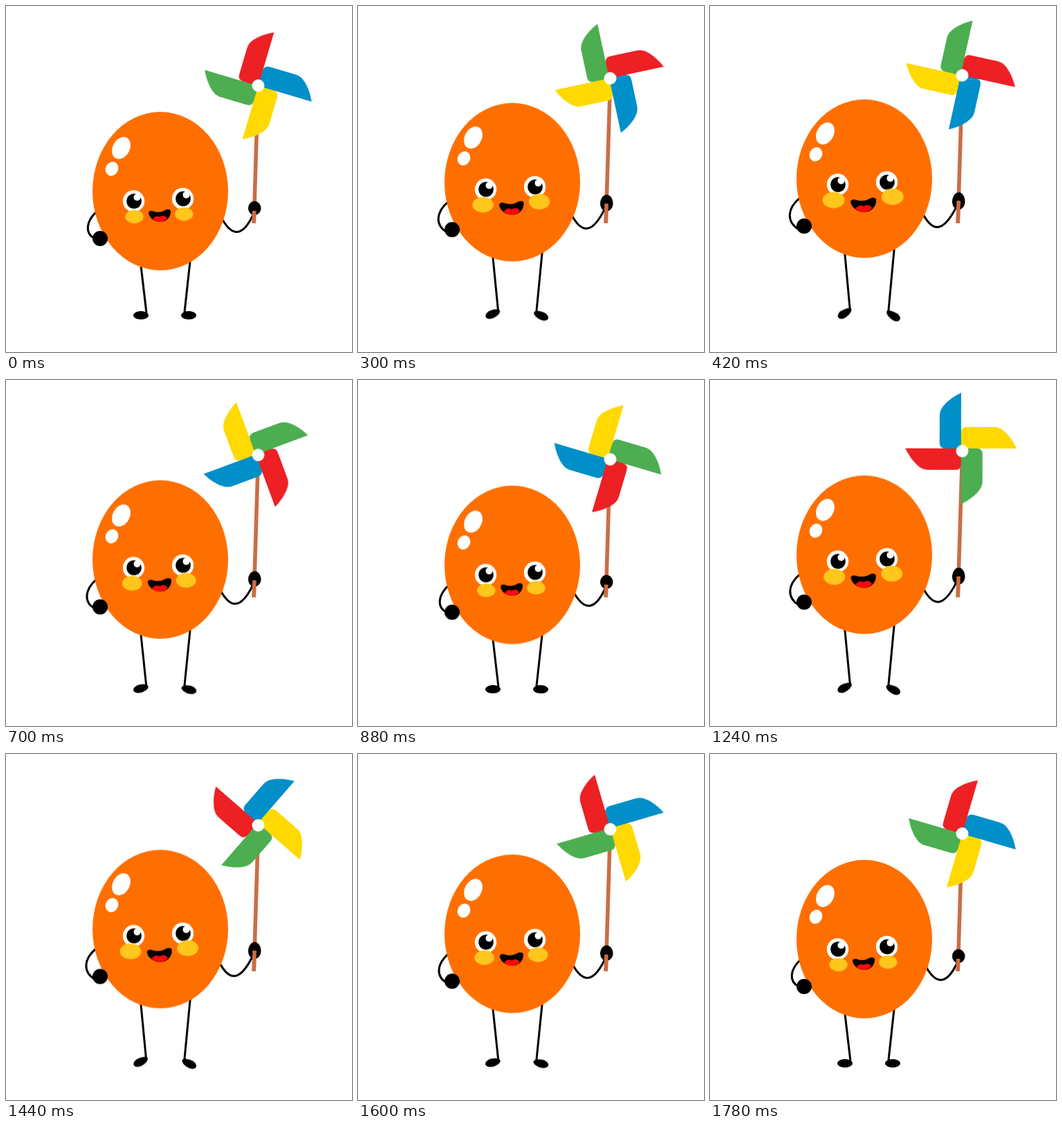
These frames come from a looping animation (500 px wide and 500 px high, 1800 ms). An HTML page without scripts:

```html
<!DOCTYPE html>
<html lang="en">
<head>
<meta charset="utf-8">
<title>Balloon with pinwheel</title>
<style>
  html, body { margin: 0; width: 100%; height: 100%; overflow: hidden; background: #fff; }
  svg { display: block; width: 100%; height: 100%; }

  /* two bounces per loop, then a short rest */
  @keyframes lift {
    0%, 49.44%, 98.89%, 100% { transform: none; }
    24.72%, 74.17% { transform: var(--up); }
  }
  @keyframes morph {
    0%, 49.44%, 98.89%, 100% { d: var(--a); }
    24.72%, 74.17% { d: var(--b); }
  }
  @keyframes spin {
    0% { transform: rotate(0deg); }
    97.78%, 100% { transform: rotate(360deg); }
  }
  .lift { animation: lift 1.8s linear infinite; }
  .morph { d: var(--a); animation: morph 1.8s linear infinite; }
  .spin { animation: spin 1.8s linear infinite; }

  .line { fill: none; stroke: #000; stroke-width: 3; }
  .stick { fill: none; stroke: #c96d46; stroke-width: 5.6; }
  .cheek { fill: #ffc61c; }
  .foot {
    --a: path("M-11 0C-11 -3.3 -6 -6 0 -6C6 -6 11 -3.3 11 0C11 3.3 6 6 0 6C-6 6 -11 3.3 -11 0Z");
    --b: path("M-11 0C-11 -3.6 -7 -6 -2 -5.6C3 -5.2 11 -3 11.5 0C11.5 3 6 5.4 0 5.8C-6 6.2 -11 3.6 -11 0Z");
  }
</style>
</head>
<body>
<svg viewBox="0 0 500 500">
  <defs>
    <path id="blade" d="M0 -80.5C-10 -76 -28 -64 -30.5 -52Q-31 -50 -31 -47V-8Q-31 0 -23 0H0Z"/>
    <g id="eye">
      <circle r="15.7" fill="#fff"/>
      <circle cx=".5" r="10.8"/>
      <circle cx="5" cy="-5.6" r="5" fill="#fff"/>
    </g>
  </defs>

  <!-- legs -->
  <path class="line morph" style="--a:path('M193.2 360L203 444');--b:path('M193.4 341L202.2 438')"/>
  <path class="line morph" style="--a:path('M267 360L257.8 444');--b:path('M267 341L257.5 445')"/>
  <g transform="translate(195 447)">
    <g class="lift" style="--up:translate(-.5px,-3.2px) rotate(-38deg)"><path class="foot morph"/></g>
  </g>
  <g transform="translate(264 447) scale(-1 1)">
    <g class="lift" style="--up:translate(-1px,.5px) rotate(-38deg)"><path class="foot morph"/></g>
  </g>

  <!-- arms -->
  <path class="line morph" style="--a:path('M131 297C115 312 114 329 128 336');--b:path('M130 276C110.500 292 110.500 311 128 322')"/>
  <path class="line morph" style="--a:path('M313 309C326 331 341 336 357 302');--b:path('M307.700 300.500C320.700 324.600 335.700 329.600 356 289.500')"/>

  <!-- body -->
  <ellipse class="lift" style="--up:translate(0,-19px)" cx="223" cy="267.5" rx="98" ry="114.500" fill="#ff6f00"/>
  <g class="lift" style="--up:translate(0,-22.200px)" fill="#fff">
    <ellipse transform="translate(166.500 205.200) rotate(28)" rx="12.200" ry="16.800"/>
    <ellipse transform="translate(153 235.300) rotate(28)" rx="9" ry="10.500"/>
  </g>
  <circle class="lift" style="--up:translate(0,-19px)" cx="136" cy="336" r="11"/>

  <!-- face -->
  <g class="lift" style="--up:translate(0,-25.300px)">
    <use href="#eye" x="184.500" y="282"/>
    <use href="#eye" x="255.500" y="278.500"/>
  </g>
  <g transform="translate(185.500 304.500)">
    <ellipse class="cheek lift" style="--up:translate(-7.400px,-25.400px) scale(1.22)" rx="13.200" ry="9.700"/>
  </g>
  <g transform="translate(257.300 300.700)">
    <ellipse class="cheek lift" style="--up:translate(6.900px,-26.400px) scale(1.22)" rx="13.200" ry="9.700"/>
  </g>
  <g transform="translate(222 303)">
    <g class="lift" style="--up:translate(-.4px,-16.400px) scale(1.17)">
      <path d="M-16 -4C-15 -8 -11 -7 -8 -6C-3 -4.500 3 -5 7 -7.500C12 -10 16 -9 16 -6C16 3 9 9 1 9C-8 9 -15 3 -16 -4Z"/>
      <path fill="#ff0a0a" d="M-10 5C-7 0 -2 0 0 2C4 -1 9 0 11 4C8 7.500 4 9 1 9C-3.500 9 -7 7.500 -10 5Z"/>
    </g>
  </g>

  <!-- stick and hand -->
  <path class="stick morph" style="--a:path('M358.200 314L364.300 115');--b:path('M358.200 314L364.800 99.400')"/>
  <path class="morph" style="--a:path('M359 282C364 282 368.500 287 368.500 292C368.500 298 364 302 359 302C354 302 350 298 350 292C350 287 354 282 359 282Z');--b:path('M359.500 268.500C366 268.500 368.500 277 368.500 282C368.500 289 364 294 359 294C354 294 350 289 350 282C350 277 353 268.500 359.500 268.500Z')"/>
  <path class="stick morph" style="--a:path('M358.200 314L358.700 296');--b:path('M358.200 314L359.200 280.500')"/>

  <!-- pinwheel -->
  <g class="lift" style="--up:translate(0,-17.800px)">
    <g transform="translate(362.700 114.800)">
      <g class="spin">
        <g transform="translate(1.800 .6) rotate(16.300)">
          <use href="#blade" fill="#ed2024"/>
          <use href="#blade" fill="#008fc8" transform="rotate(90)"/>
          <use href="#blade" fill="#ffd900" transform="rotate(180)"/>
          <use href="#blade" fill="#4cae50" transform="rotate(270)"/>
        </g>
      </g>
    </g>
  </g>
  <circle class="lift" style="--up:translate(0,-15.600px)" cx="364.500" cy="115" r="9" fill="#fff"/>
</svg>
</body>
</html>
```
